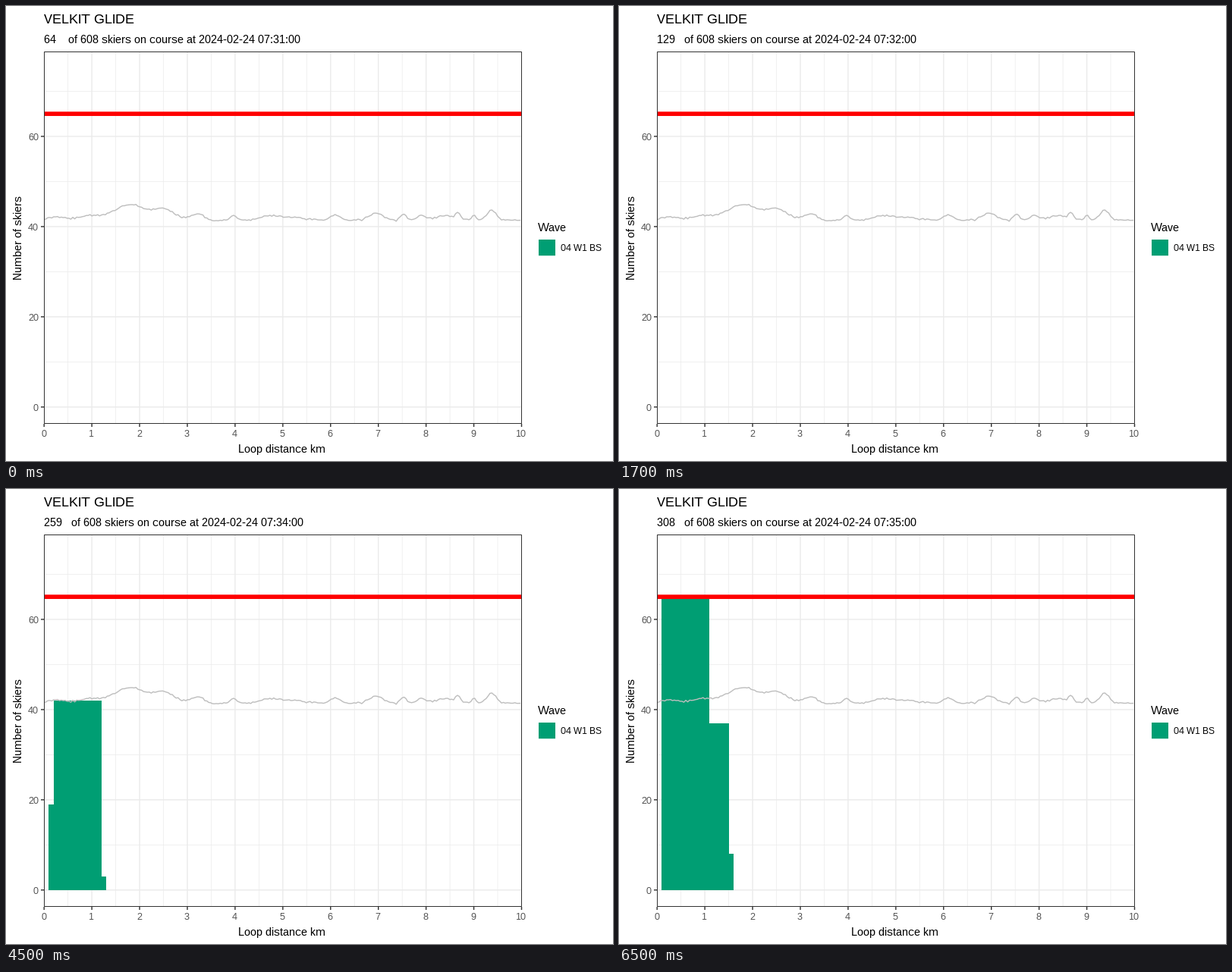
Recreate the animation shown at these times as a matplotlib script. Size 800 by 600 pixels, loop 8000 ms.

```python
import matplotlib.pyplot as plt
import numpy as np
from matplotlib.animation import FuncAnimation
from matplotlib.patches import Rectangle

WIDTH, HEIGHT, DPI = 800, 600, 100
PX = 72 / DPI  # points per pixel
LEFT, RIGHT, TOP, BOTTOM = 50, 680, 60, 551
GREEN, DARK, GRID = "#009E73", "#333333", "#EBEBEB"
SMALL, MEDIUM, LARGE = 11.73, 14.67, 17.6  # text heights in pixels
THIN, NORMAL, THICK = 0.71, 1.42, 5.69  # line widths in pixels

INTERVAL, FRAMES = 500, 16
FRAMES_PER_MINUTE, FIRST_MINUTE_SKIPS = 4, 3
SKIERS_PER_MINUTE, ALL_STARTED = 65, 308

# Overlapping bars by minute: (start km, end km, skiers)
BARS = {
    2: [(0, 1, 3)],
    3: [(0.1, 1.3, 3), (0.1, 1.2, 19), (0.2, 1.2, 42)],
    4: [(0.1, 1.6, 8), (0.1, 1.5, 37), (0.1, 1.1, 65)],
}
# Course hills: (centre km, height, spread km)
HILLS = [
    (0.25, 0.8, 0.15), (0.95, 1.0, 0.25), (1.8, 3.5, 0.32), (2.52, 2.3, 0.22),
    (3.2, 1.5, 0.13), (3.97, 1.1, 0.06), (4.72, 1.0, 0.18), (5.25, 0.6, 0.25),
    (6.1, 1.2, 0.1), (6.95, 1.5, 0.15), (7.53, 1.4, 0.06), (7.9, 1.0, 0.1),
    (8.38, 1.1, 0.17), (8.67, 1.5, 0.05), (9.0, 1.3, 0.04), (9.37, 2.2, 0.1),
]

# Whole-pixel glyph advances
plt.rcParams.update({"font.family": "Liberation Sans",
                     "text.hinting": "default", "text.hinting_factor": 1})
fig = plt.figure(figsize=(WIDTH / DPI, HEIGHT / DPI), dpi=DPI, facecolor="white")
ax = fig.add_axes([0, 0, 1, 1])
ax.set(xlim=(0, WIDTH), ylim=(HEIGHT, 0))
ax.axis("off")


def x_px(km):
    return 50.2 + 62.93 * km


def y_px(skiers):
    return 528.8 - 5.948 * skiers


def line(xs, ys, color, width, z):
    ax.plot(xs, ys, color=color, lw=width * PX, zorder=z, snap=False,
            solid_capstyle="butt", solid_joinstyle="round")


def label(x, y, text, size, color="black", ha="left", **kwargs):
    return ax.text(x, y, text, fontsize=size * PX, color=color, ha=ha,
                   va="baseline", **kwargs)


def box(x0, y0, x1, y1, **kwargs):
    return ax.add_patch(Rectangle((x0, y0), x1 - x0, y1 - y0, **kwargs))


def draw_grid():
    for half in range(1, 20):
        x = x_px(half / 2)
        line([x, x], [TOP, BOTTOM], GRID, THIN if half % 2 else NORMAL, 1)
    for skiers in range(0, 80, 10):
        y = y_px(skiers)
        line([LEFT, RIGHT], [y, y], GRID, THIN if skiers % 20 else NORMAL, 1)


def draw_axes():
    box(LEFT + 0.5, TOP + 0.5, RIGHT - 0.5, BOTTOM - 0.5,
        fill=False, ec=DARK, lw=PX, zorder=5, snap=False)
    for km in range(11):
        x = x_px(km)
        line([x, x], [BOTTOM, BOTTOM + 4], DARK, NORMAL, 5)
        label(x - 0.5, 568, str(km), SMALL, "#4D4D4D", "center")
    for skiers in range(0, 61, 20):
        y = y_px(skiers)
        line([LEFT - 4, LEFT], [y, y], DARK, NORMAL, 5)
        label(43, y + 5, str(skiers), SMALL, "#4D4D4D", "right")
    label(364, 589, "Loop distance km", MEDIUM, ha="center")
    label(21, 305.5, "Number of skiers", MEDIUM, ha="center",
          rotation=90, rotation_mode="anchor")


def draw_legend():
    label(701, 297, "Wave", MEDIUM)
    box(702, 308, 724, 329.2, fc=GREEN, lw=0, snap=False)
    label(731, 323, "04 W1 BS", SMALL)


def draw_course():
    km = np.linspace(0, 9.98, 250)
    height = 41.4 + np.random.default_rng(4).normal(0, 0.1, km.size)
    for centre, rise, spread in HILLS:
        height += rise * np.exp(-((km - centre) / spread) ** 2 / 2)
    line(x_px(km), y_px(height), "#BEBEBE", NORMAL, 3)


draw_grid()
draw_axes()
draw_legend()
draw_course()
line([LEFT, RIGHT], [y_px(65)] * 2, "red", THICK, 4)
label(50, 23, "VELKIT GLIDE", LARGE)
subtitle = label(50, 49, "", MEDIUM)
bars = [box(0, 0, 0, 0, fc=GREEN, lw=0, zorder=2) for _ in range(3)]


def update(frame):
    minute = (frame + FIRST_MINUTE_SKIPS) // FRAMES_PER_MINUTE
    on_course = min(64 + SKIERS_PER_MINUTE * minute, ALL_STARTED)
    subtitle.set_text(f"{on_course:<6}of 608 skiers on course at "
                      f"2024-02-24 07:{31 + minute}:00")
    for bar in bars:
        bar.set_visible(False)
    for bar, (start, end, skiers) in zip(bars, BARS.get(minute, [])):
        bar.set_visible(True)
        bar.set_bounds(x_px(start), y_px(skiers), x_px(end) - x_px(start),
                       y_px(0) - y_px(skiers))
    return [subtitle, *bars]


animation = FuncAnimation(fig, update, frames=FRAMES, interval=INTERVAL,
                          repeat=True, repeat_delay=0, blit=False)
plt.show()
```
